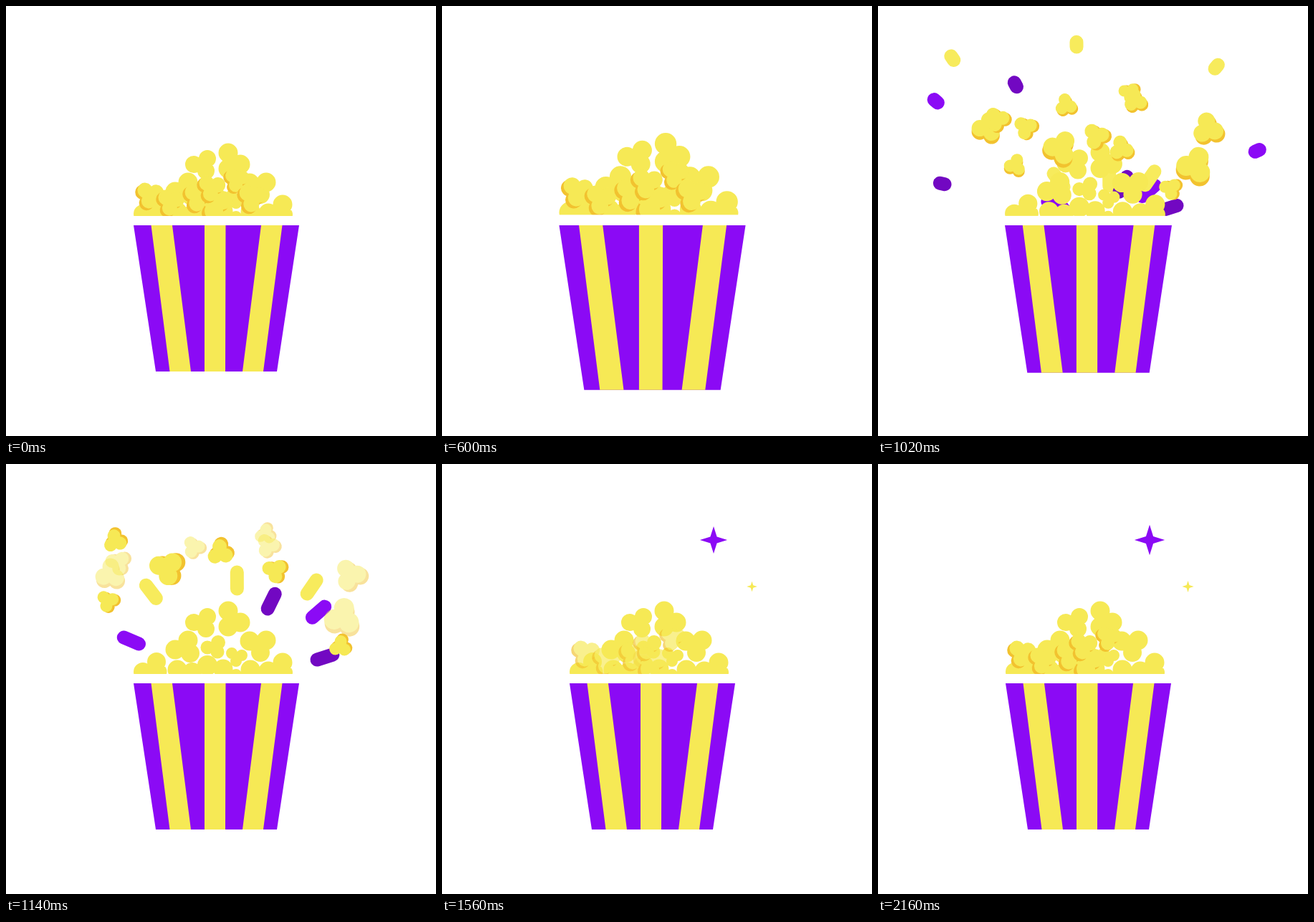
Recreate the animation shown at these times as an HTML page. Size 600x600 px, loop 2190 ms.

```html
<!DOCTYPE html>
<html lang="en">
<head>
<meta charset="utf-8">
<title>Popcorn</title>
<style>
  html, body { margin: 0; width: 100%; height: 100%; overflow: hidden; background: #fff; }
  svg { display: block; width: 100vw; height: 100vh; }
  .yellow { fill: #f6e955; }
  .shade { fill: #f2c22f; }
  .purple { fill: #8b0af5; }
  .dark { fill: #7208c2; }
  line { stroke-width: 19; stroke-linecap: round; }
  line.yellow { stroke: #f7eb5c; }
  line.purple { stroke: #8b0af5; }
  line.dark { stroke: #7208c2; }
</style>
</head>
<body>
<svg viewBox="0 0 600 600">
  <g id="confetti"></g>
  <g id="pile"></g>
  <g id="kernels"></g>
  <g id="bucket"></g>
  <g id="stars"></g>
</svg>
<script>
const LOOP = 2190;
const CX = 293.5, RIM = 306, HEIGHT = 204;
const ZOOM_START = 150, ZOOM_PEAK = 595, ZOOM_END = 1100;
const LAUNCH = 620, LAUNCH_2 = 880, POSE_1 = 1020, POSE_2 = 1290, FADE = 200;

const byId = id => document.getElementById(id);
const clamp = v => Math.max(0, Math.min(1, v));
const ramp = (t, a, b) => clamp((t - a) / (b - a));
const smooth = p => p * p * (3 - 2 * p);
const lerp = (a, b, p) => a + (b - a) * p;
const rad = deg => deg * Math.PI / 180;

function add(parent, tag, attrs) {
  const el = document.createElementNS('http://www.w3.org/2000/svg', tag);
  set(el, attrs);
  return parent.appendChild(el);
}
function set(el, attrs) {
  for (const key in attrs) el.setAttribute(key, attrs[key]);
}
const disc = (x, y, r) =>
  `M${x - r} ${y}a${r} ${r} 0 1 1 ${2 * r} 0a${r} ${r} 0 1 1 ${-2 * r} 0z`;

// Fixed heap of popcorn: x, y, radius
const heap = [
  [262, 221, 12], [281, 213, 12], [279, 230, 12],
  [310, 205, 13.5], [327, 221, 13.5], [310, 227, 13.5],
  [254, 246, 13.5], [236, 259, 13.5], [257, 264, 13],
  [340, 247, 13.5], [363, 246, 13.5], [355, 263, 13],
  [281, 256, 9.5], [296, 249, 10], [295, 262, 9.5],
  [315, 264, 8], [329, 267, 8], [321, 275, 8],
  [210, 276, 13], [191, 290, 13], [213, 290, 11.5], [239, 287, 13.5], [260, 290, 13],
  [281, 281, 14], [303, 286, 13.5], [321, 294, 8], [341, 287, 13.5],
  [366, 289, 13.5], [386, 277, 13.5], [389, 291, 11]
];
const pile = byId('pile');
const seed = add(pile, 'circle', { class: 'dark', cx: 231, cy: 294, r: 9 });
add(pile, 'path', { class: 'yellow', d: heap.map(c => disc(...c)).join('') });

// A kernel is three discs over three offset shade discs, for radius 1
const lobes = [-40, 80, 200].map(a => [0.87 * Math.cos(rad(a)), 0.87 * Math.sin(rad(a))]);
function makeKernel(spec) {
  const el = add(byId('kernels'), 'g', {});
  const draw = (name, dx) =>
    add(el, 'path', { class: name, d: lobes.map(([x, y]) => disc(x + dx, y, 1)).join('') });
  draw('shade', 0.4);
  draw('yellow', 0);
  return { el, ...spec };
}

// Kernels resting on the heap: rest x, y, radius; flight x, y, radius, turn; comes back
const resting = [
  [292, 275, 13, 442, 222, 14, 95, 1],
  [201, 263, 10.5, 152, 169, 11.5, 90, 1],
  [230, 273, 10.5, 166, 158, 9.5, 30, 1],
  [268, 266, 11, 262, 138, 8.5, 60, 1],
  [287, 253, 10.5, 350, 121, 8, 0, 1],
  [322, 242, 9.5, 359, 132, 9, 60, 1],
  [344, 267, 11, 460, 171, 12, 60, 0]
].map(([x, y, r, fx, fy, fr, turn, back]) => makeKernel({ x, y, r, fx, fy, fr, turn, back }));

// Kernels shot later from inside: two poses, radius, two turns, opacity in the second pose
const shot = [
  [206, 170, 113, 98, 9, 20, -160, 0.35],
  [192, 222, 127, 201, 8.5, 90, -60, 0.6],
  [255, 198, 188, 127, 13, 105, -135, 0.78],
  [304, 182, 274, 110, 10, 30, -160, 0.38],
  [339, 199, 414, 136, 9.5, 60, -70, 0.6],
  [407, 255, 490, 306, 8.5, 0, -100, 0.4]
].map(([x1, y1, x2, y2, r, a1, a2, alpha]) => makeKernel({ x1, y1, x2, y2, r, a1, a2, alpha }));

function place(el, x, y, r, turn, alpha) {
  set(el, {
    transform: `translate(${x} ${y}) rotate(${turn}) scale(${r})`,
    opacity: alpha,
    visibility: alpha > 0 ? 'visible' : 'hidden'
  });
}

// Parabola through three timed values
function curve(t, t0, v0, t1, v1, t2, v2) {
  return v0 * (t - t1) * (t - t2) / ((t0 - t1) * (t0 - t2))
       + v1 * (t - t0) * (t - t2) / ((t1 - t0) * (t1 - t2))
       + v2 * (t - t0) * (t - t1) / ((t2 - t0) * (t2 - t1));
}

function moveResting(k, t, zoom) {
  const LAND = 1235, FAR = 1200;
  if (t < LAUNCH || t >= LAND) {
    const alpha = t < LAUNCH ? 1 : k.back * ramp(t, 1110, 1790);
    place(k.el, CX + (k.x - CX) * zoom, RIM + (k.y - RIM) * zoom, k.r * zoom, 140, alpha);
    return;
  }
  const z = zoomAt(LAUNCH);
  const fly = (rest, mid) => {
    const from = mid + (rest - mid) * 1;
    return curve(t, LAUNCH, from, POSE_1, mid, FAR, mid + 0.25 * (mid - from));
  };
  const p = (t - LAUNCH) / (POSE_1 - LAUNCH);
  place(k.el,
    fly(CX + (k.x - CX) * z, k.fx), fly(RIM + (k.y - RIM) * z, k.fy),
    lerp(k.r * z, k.fr, clamp(p)), lerp(140, k.turn, p), 1 - ramp(t, 1035, 1035 + FADE));
}

function moveShot(k, t) {
  const gone = POSE_2 + FADE * k.alpha;
  const alpha = t < LAUNCH_2 ? 0 : 1 - ramp(t, gone - FADE, gone);
  const path = (from, a, b) => curve(t, LAUNCH_2, from, POSE_1, a, POSE_2, b);
  place(k.el, path(CX, k.x1, k.x2), path(302, k.y1, k.y2), k.r,
    lerp(k.a1, k.a2, (t - POSE_1) / (POSE_2 - POSE_1)), alpha);
}

// Confetti: colour, start x, start y, reference x, y
const bursts = [
  { start: 640, ref: 380, list: [
    ['yellow', 255, 290, 104, 73], ['purple', 267, 290, 81, 133], ['dark', 288, 290, 192, 110],
    ['dark', 293, 296, 90, 248], ['yellow', 280, 290, 277, 54], ['yellow', 300, 290, 472, 85],
    ['purple', 333, 290, 529, 202]] },
  { start: 950, ref: 340, list: [
    ['yellow', 288, 290, 160, 123], ['purple', 300, 300, 113, 220], ['yellow', 323, 295, 322, 97],
    ['dark', 322, 290, 394, 143], ['purple', 335, 295, 486, 163], ['dark', 378, 291, 478, 259],
    ['yellow', 345, 290, 467, 113]] }
];
const pills = bursts.flatMap(({ start, ref, list }) => list.map(([name, ox, oy, x, y]) => ({
  el: add(byId('confetti'), 'line', { class: name }), start, ref, ox, oy, x, y
})));
const thrust = age => 1 - (1 - clamp(age / 560)) ** 2;

function movePill(p, t) {
  const age = t - p.start;
  const g = thrust(age) / thrust(p.ref);
  const dx = p.x - p.ox, dy = p.y - p.oy, dist = Math.hypot(dx, dy);
  const length = age < 340 ? Math.min(23, 1.6 * g * dist) : 23 * (1 - ramp(age, 340, 398));
  const ux = dx / dist * length / 2, uy = dy / dist * length / 2;
  const x = p.ox + dx * g, y = p.oy + dy * g;
  set(p.el, {
    x1: x - ux, y1: y - uy, x2: x + ux + 0.01, y2: y + uy,
    'stroke-width': 19,
    visibility: age >= 0 && age < 440 ? 'visible' : 'hidden'
  });
  p.el.style.strokeWidth = 19 * (1 - ramp(age, 398, 440));
}

// Bucket: stripe borders at the rim and at the base
const topX = [178, 202.5, 232, 277, 306.5, 356, 385.5, 409];
const baseX = [209, 228.5, 258, 277, 306, 330, 359, 378];
const rim = add(byId('bucket'), 'rect', { fill: '#fff' });
const panels = [['purple', 0, 7], ['yellow', 1, 2], ['yellow', 3, 4], ['yellow', 5, 6]]
  .map(([name, a, b]) => ({ el: add(byId('bucket'), 'path', { class: name }), a, b }));

function zoomAt(t) {
  const p = t < ZOOM_PEAK ? ramp(t, ZOOM_START, ZOOM_PEAK) : 1 - ramp(t, ZOOM_PEAK, ZOOM_END);
  return 1 + 0.126 * smooth(p);
}
function bulgeAt(t) {
  const p = t < 330 ? t / 330 : 1 - ramp(t, 330, 570);
  return 0.245 * Math.sin(Math.PI / 2 * p) ** 2;
}

function drawBucket(zoom, bulge) {
  set(rim, { x: CX - 122 * zoom, y: RIM - 13 * zoom, width: 244 * zoom, height: 13 * zoom + 0.5 });
  const point = (top, base, v) => {
    const off = (lerp(top, base, v) - CX) * zoom;
    const x = CX + off * (1 + bulge * (Math.sin(Math.PI * v) + 0.2 * v));
    const y = RIM + HEIGHT * zoom * v + 15 * bulge * v * (off / 85) ** 2;
    return x.toFixed(2) + ' ' + y.toFixed(2);
  };
  const STEPS = 20;
  for (const { el, a, b } of panels) {
    const left = [], base = [], right = [];
    for (let i = 0; i <= STEPS; i++) {
      const v = i / STEPS;
      left.push(point(topX[a], baseX[a], v));
      base.push(point(0, lerp(baseX[a], baseX[b], v), 1));
      right.unshift(point(topX[b], baseX[b], v));
    }
    el.setAttribute('d', 'M' + [...left, ...base, ...right].join('L') + 'z');
  }
}

// Four-pointed stars
const stars = [['purple', 379, 106, 56], ['yellow', 432.5, 171, 21.5]].map(([name, x, y, size]) => ({
  el: add(byId('stars'), 'path', {
    class: name,
    d: 'M0-1L.24-.24L1 0L.24 .24L0 1L-.24 .24L-1 0L-.24-.24z'
  }), x, y, size
}));

function render(t) {
  const zoom = zoomAt(t);
  pile.setAttribute('transform', `translate(${CX} ${RIM}) scale(${zoom}) translate(${-CX} ${-RIM})`);
  seed.setAttribute('visibility', t < LAUNCH ? 'visible' : 'hidden');
  for (const p of pills) movePill(p, t);
  for (const k of resting) moveResting(k, t, zoom);
  for (const k of shot) moveShot(k, t);
  drawBucket(zoom, bulgeAt(t));
  const glow = smooth(t < 1860 ? ramp(t, 1368, 1860) : 1 - ramp(t, 1860, 2377));
  for (const s of stars) place(s.el, s.x, s.y, s.size * glow, 0, glow > 0 ? 1 : 0);
}

const begin = performance.now();
function tick() {
  render((performance.now() - begin) % LOOP);
  requestAnimationFrame(tick);
}
tick();
</script>
</body>
</html>
```
